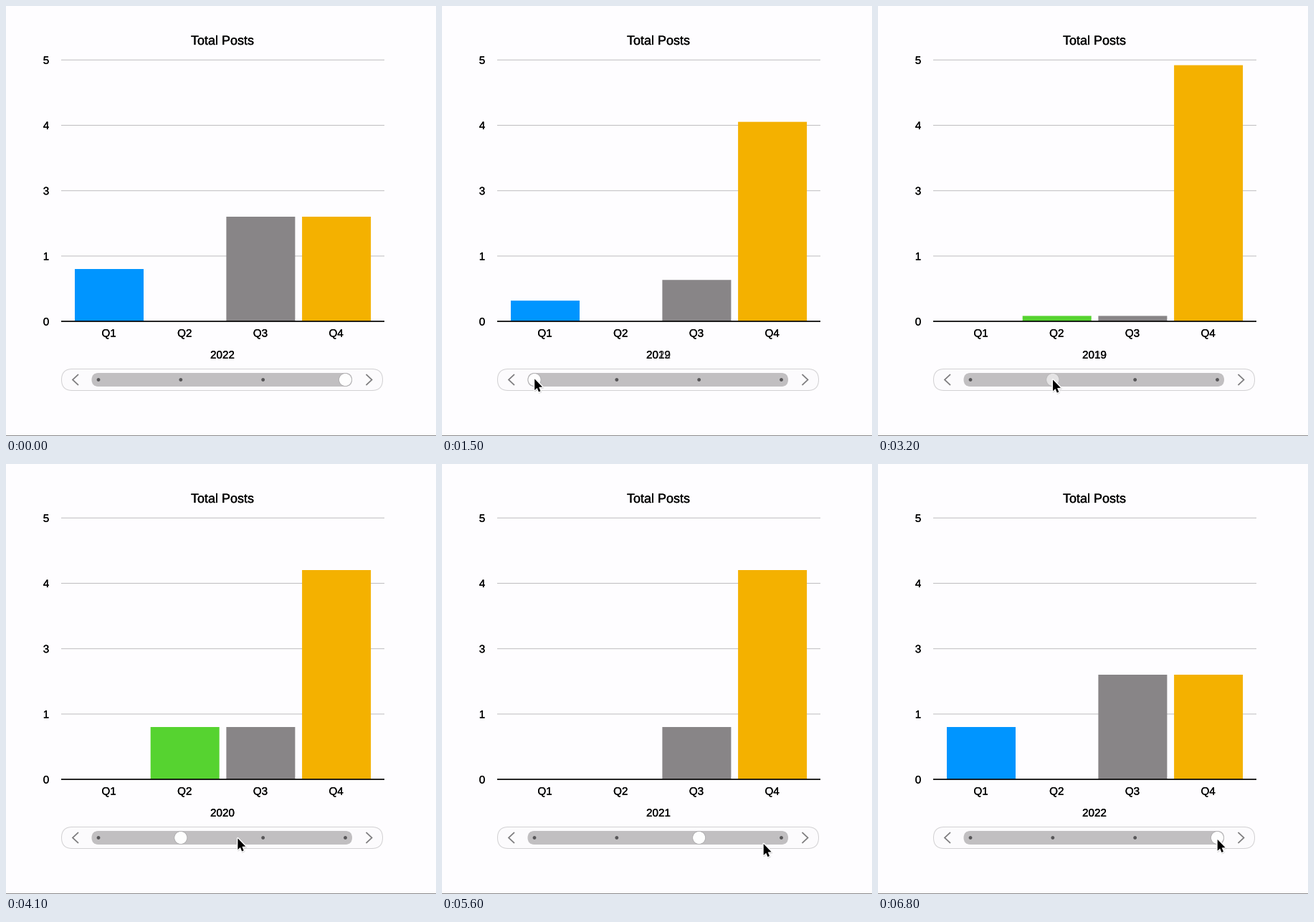
These frames come from a looping animation (600x600 px, 8800 ms). A matplotlib script:

```python
import numpy as np
import matplotlib
import matplotlib.pyplot as plt
from matplotlib.animation import FuncAnimation
from matplotlib.patches import Circle, FancyBboxPatch, Polygon, Rectangle
from matplotlib.patheffects import Normal, Stroke

matplotlib.rcParams["font.family"] = "Liberation Sans"
matplotlib.rcParams["text.hinting"] = "none"
matplotlib.rcParams["toolbar"] = "None"

PX = 0.72  # points per pixel at 100 dpi
STEP, FRAMES = 100, 88
BASE, UNIT = 440, 73
BG, GRID, MARK = "#fefdff", "#c3c2c4", "#7c7b7d"
SLIDER_Y = 521.5
STOPS = np.linspace(129, 473.5, 4)

# Posts per quarter, one row for each year from 2019
POSTS = np.array([[0, 0, 0, 5], [0, 1, 1, 4], [0, 0, 1, 4], [1, 0, 2, 2]])
COLORS = ["#0095ff", "#56d330", "#888587", "#f4b100"]

# One hop per stop, in steps: move start, move end, click; ease power, sag
HOPS = [(5, 10, 12.15, 1.5, 0), (20, 29, 31, 1.3, 0),
        (38, 46, 47, 2.5, 0), (52, 60, 62.15, 2.2, 48)]
SWITCH_STEPS, KNOB_STEPS = 5, 1.7

fig = plt.figure(figsize=(6, 6), dpi=100, facecolor=BG)
ax = fig.add_axes([0, 0, 1, 1])
ax.set_xlim(0, 600)
ax.set_ylim(600, 0)
ax.axis("off")


def line(xs, ys, color, width, z=1):
    ax.plot(xs, ys, color=color, lw=width * PX, zorder=z, snap=False,
            solid_capstyle="butt", solid_joinstyle="miter")


def label(x, y, s, size=15.2, ha="center"):
    heavier = [Stroke(linewidth=0.25 * PX, foreground="black"), Normal()]
    return ax.text(x, y, s, fontsize=size * PX, ha=ha, va="baseline",
                   color="black", zorder=4, path_effects=heavier)


def box(x, y, w, h, color, z=2):
    return ax.add_patch(Rectangle((x, y), w, h, fc=color, lw=0,
                                  zorder=z, snap=False))


def pill(x, w, h, z, **style):
    shape = f"round,pad=0,rounding_size={h / 2}"
    ax.add_patch(FancyBboxPatch((x, SLIDER_Y - h / 2), w, h,
                                boxstyle=shape, zorder=z, **style))


def chevron(tip, back):
    ys = SLIDER_Y + np.array([-7.5, 0, 7.5])
    line([back, tip, back], ys, MARK, 1.7, 3)


def circle(x, r, z, **style):
    return ax.add_patch(Circle((x, SLIDER_Y), r, zorder=z, **style))


# Chart
label(302, 54, "Total Posts", 18)
for k, name in enumerate("01345"):
    y = BASE - 91.2 * k
    label(56, y + 5.6, name)
    if k:
        line([77, 528], [y + 0.1, y + 0.1], GRID, 1.1)
line([77, 528], [BASE, BASE], "black", 1.7, 3)
box(0, 599, 600, 1, "#8c8b8d")

bars = []
for k, color in enumerate(COLORS):
    x = 96 + 105.7 * k
    bars.append(box(x, BASE, 96, 0, color))
    label(x + 47.6, 461.6, f"Q{k + 1}")

label(302, 491.8, "20", ha="right")
old_year = label(302, 491.8, "", ha="left")
new_year = label(302, 491.8, "", ha="left")

# Slider
pill(77.5, 448, 30, 1, fc="#fcfbfd", ec="#d2d1d3", lw=PX)
pill(119.5, 363.5, 19, 2, fc="#c1bfc1", lw=0)
chevron(93, 101)
chevron(510.5, 502.5)
dots = [circle(x, 2.4, 3, fc="#575658", lw=0) for x in STOPS]
knob = circle(0, 9, 4, fc="#fefefe", ec="#a9a8aa", lw=0.8 * PX)

# Pointer: shadow, white rim, black body
ARROW = np.array([(0, 0), (0, 15.8), (3.5, 12.6), (5.8, 18.1),
                  (8.3, 17), (6, 11.5), (10.9, 11.3)])
pointer = []
for color, width, alpha, drop in [("black", 2.4, 0.16, 1),
                                  ("white", 2.8, 1, 0), ("black", 0, 1, 0)]:
    part = Polygon(ARROW, fc=color, ec=color, lw=width * PX, alpha=alpha,
                   joinstyle="round", zorder=5)
    pointer.append((ax.add_patch(part), drop))


def ramp(t, start, length):
    return min(max((t - start) / length, 0), 1)


def smooth(u):
    return u * u * (3 - 2 * u)


def pointer_at(i):
    pos = np.array([172.7, 572.8])
    for k, (start, end, _, power, sag) in enumerate(HOPS):
        p = 1 - (1 - ramp(i, start, end - start)) ** power
        goal = np.array([STOPS[k] + 0.2, 520.3 + 1.2 * k])
        pos = pos + (goal - pos) * p + [0, sag * p * p * (1 - p)]
    return pos


def update(i):
    old = new = 3
    p = shown = 1
    for k, (_, _, click, _, _) in enumerate(HOPS):
        if i > click:
            old, new = (k - 1) % 4, k
            p = smooth(ramp(i, click, SWITCH_STEPS))
            shown = ramp(i, click, KNOB_STEPS)

    for bar, value in zip(bars, POSTS[old] * (1 - p) + POSTS[new] * p):
        bar.set_y(BASE - value * UNIT)
        bar.set_height(value * UNIT)
    for text, year, alpha in [(old_year, old, 1 - p), (new_year, new, p)]:
        text.set_text(str(19 + year))
        text.set_alpha(alpha)
        text.set_visible(alpha > 0)

    knob.center = (STOPS[new], SLIDER_Y)
    knob.set_alpha(shown)
    for k, dot in enumerate(dots):
        dot.set_visible(k != new)

    pos = pointer_at(i)
    for part, drop in pointer:
        part.set_xy(ARROW + pos + [drop / 2, drop])
        part.set_visible(i >= 4)
    return []


anim = FuncAnimation(fig, update, frames=FRAMES, interval=STEP,
                     init_func=lambda: update(0), repeat=True,
                     repeat_delay=0, blit=False)
plt.show()
```
